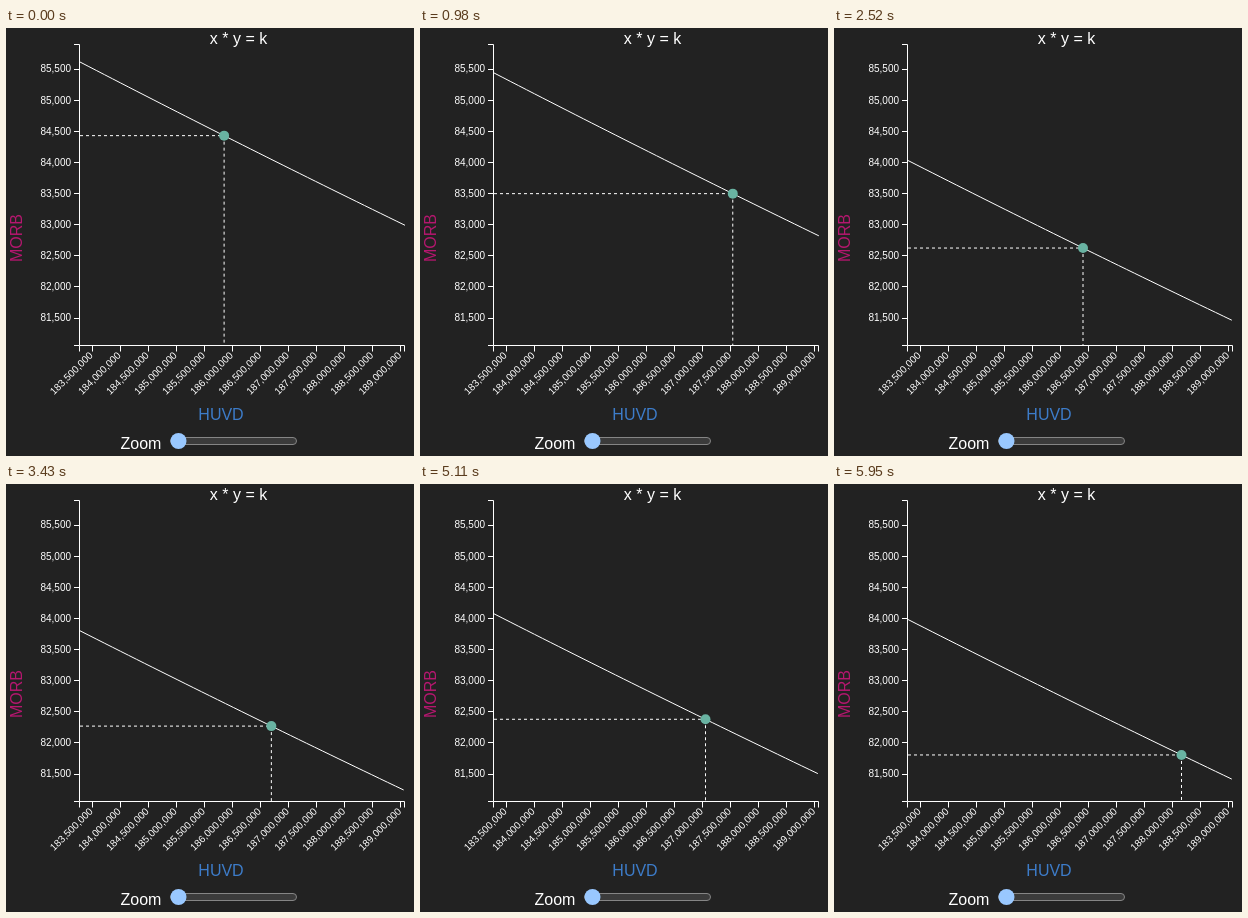
An HTML page with a canvas that plays this animation: 408 px wide and 428 px high, repeating every 6020 ms.

```html
<!DOCTYPE html>
<html lang="en">
<head>
<meta charset="utf-8">
<title>Constant product curve</title>
<style>
  html, body { margin: 0; width: 100%; height: 100%; overflow: hidden; background: #222; }
  canvas { display: block; }
</style>
</head>
<body>
<canvas id="stage"></canvas>
<script>
const W = 408, H = 428, LOOP = 6020, STEP = 70;
const LEFT = 74, RIGHT = 399, TOP = 17, BOTTOM = 317;
const FONT = '"Liberation Sans", Arial, sans-serif';

const canvas = document.getElementById('stage');
const ctx = canvas.getContext('2d');
const ratio = window.devicePixelRatio || 1;
canvas.width = W * ratio;
canvas.height = H * ratio;
canvas.style.width = W + 'px';
canvas.style.height = H + 'px';
ctx.scale(ratio, ratio);

// Scales between pixels and pool reserves (x in millions)
const xValue = px => 183.5 + (px - 86) / 56.1;
const yValue = py => 81500 + (290 - py) / 0.06225;
const yPixel = v => 290 - (v - 81500) * 0.06225;

const smooth = p => (1 - Math.cos(Math.PI * p)) / 2;
const easeOut = p => 1 - (1 - p) ** 3;

// time, curve height at the left axis, dot x, easing towards the next key
const keys = [
  [0, 34, 218.1], [140, 34.1, 218.5], [210, 34.1, 218.5],
  [1120, 45.6, 318.5], [1190, 45.6, 318.5], [1750, 46, 330],
  [1820, 94.5, 284], [2450, 100.5, 278],
  [2520, 132.5, 249, easeOut], [3220, 146.5, 265], [3290, 146.5, 265],
  [3920, 149, 268], [4480, 130.7, 285.3], [4690, 130.7, 285.3],
  [5110, 129.8, 285.5], [5320, 128, 287.5], [5950, 135.5, 347.5]
];

function pose(t) {
  const next = keys.findIndex(k => k[0] > t);
  if (next < 0) return keys[keys.length - 1].slice(1, 3);
  const a = keys[next - 1], b = keys[next];
  const p = (a[3] || smooth)((t - a[0]) / (b[0] - a[0]));
  return [a[1] + (b[1] - a[1]) * p, a[2] + (b[2] - a[2]) * p];
}

function stroke(points, dash = []) {
  ctx.setLineDash(dash);
  ctx.beginPath();
  points.forEach(([x, y]) => ctx.lineTo(x, y));
  ctx.stroke();
  ctx.setLineDash([]);
}

function label(text, x, y, size, align, color = '#fff', angle = 0) {
  ctx.save();
  ctx.translate(x, y);
  ctx.rotate(angle);
  ctx.font = size + 'px ' + FONT;
  ctx.textAlign = align;
  ctx.fillStyle = color;
  ctx.fillText(text, 0, 0);
  ctx.restore();
}

function disc(x, y, r, color) {
  ctx.fillStyle = color;
  ctx.beginPath();
  ctx.arc(x, y, r, 0, Math.PI * 2);
  ctx.fill();
}

function drawAxes() {
  const x0 = LEFT - 0.5, y0 = BOTTOM + 0.5;
  stroke([[68, TOP - 0.5], [x0, TOP - 0.5], [x0, y0], [68, y0]]);
  stroke([[x0, y0 + 6], [x0, y0], [RIGHT - 0.5, y0], [RIGHT - 0.5, y0 + 6]]);
  for (let i = 0; i < 9; i++) {
    const y = 290 - i * 31.125, ty = Math.floor(y) + 0.5;
    stroke([[68, ty], [LEFT, ty]]);
    label((81500 + i * 500).toLocaleString('en-US'), 65, y + 3.4, 10, 'right');
  }
  for (let i = 0; i < 12; i++) {
    const x = 86 + i * 28.05, tx = Math.floor(x) + 0.5;
    stroke([[tx, y0], [tx, y0 + 6]]);
    label((183500000 + i * 500000).toLocaleString('en-US'),
      x + 1.4, BOTTOM + 11, 10, 'right', '#fff', -Math.PI / 4);
  }
}

function drawSlider() {
  label('Zoom', 114.5, 421, 16, 'left');
  ctx.beginPath();
  ctx.roundRect(164.5, 409.5, 126, 7, 3.5);
  ctx.fillStyle = '#3b3b3b';
  ctx.fill();
  ctx.strokeStyle = '#858585';
  ctx.stroke();
  disc(172.5, 413, 8, '#99c8ff');
}

function drawCurve(height, dotX) {
  const k = xValue(LEFT) * yValue(height);
  const curve = px => yPixel(k / xValue(px));
  const end = RIGHT - (height - 34) * 0.012;
  const dotY = curve(dotX);
  const points = [];
  for (let i = 0; i <= 40; i++) {
    const x = LEFT + (end - LEFT) * i / 40;
    points.push([x, curve(x)]);
  }
  stroke(points);
  stroke([[LEFT, dotY], [dotX, dotY]], [3, 3]);
  stroke([[dotX, dotY], [dotX, BOTTOM]], [3, 3]);
  disc(dotX, dotY, 5, '#69b3a2');
}

function draw(t) {
  ctx.fillStyle = '#222';
  ctx.fillRect(0, 0, W, H);
  ctx.strokeStyle = '#fff';
  ctx.lineWidth = 1;
  drawAxes();
  label('x * y = k', 232.5, 16, 16, 'center');
  label('MORB', 16, 210, 16, 'center', '#b5176f', -Math.PI / 2);
  label('HUVD', 215, 392, 16, 'center', '#3d7cc9');
  drawCurve(...pose(t));
  drawSlider();
}

const start = performance.now();
function frame() {
  const t = (performance.now() - start) % LOOP;
  draw(Math.floor(t / STEP) * STEP);
  requestAnimationFrame(frame);
}
frame();
</script>
</body>
</html>
```
